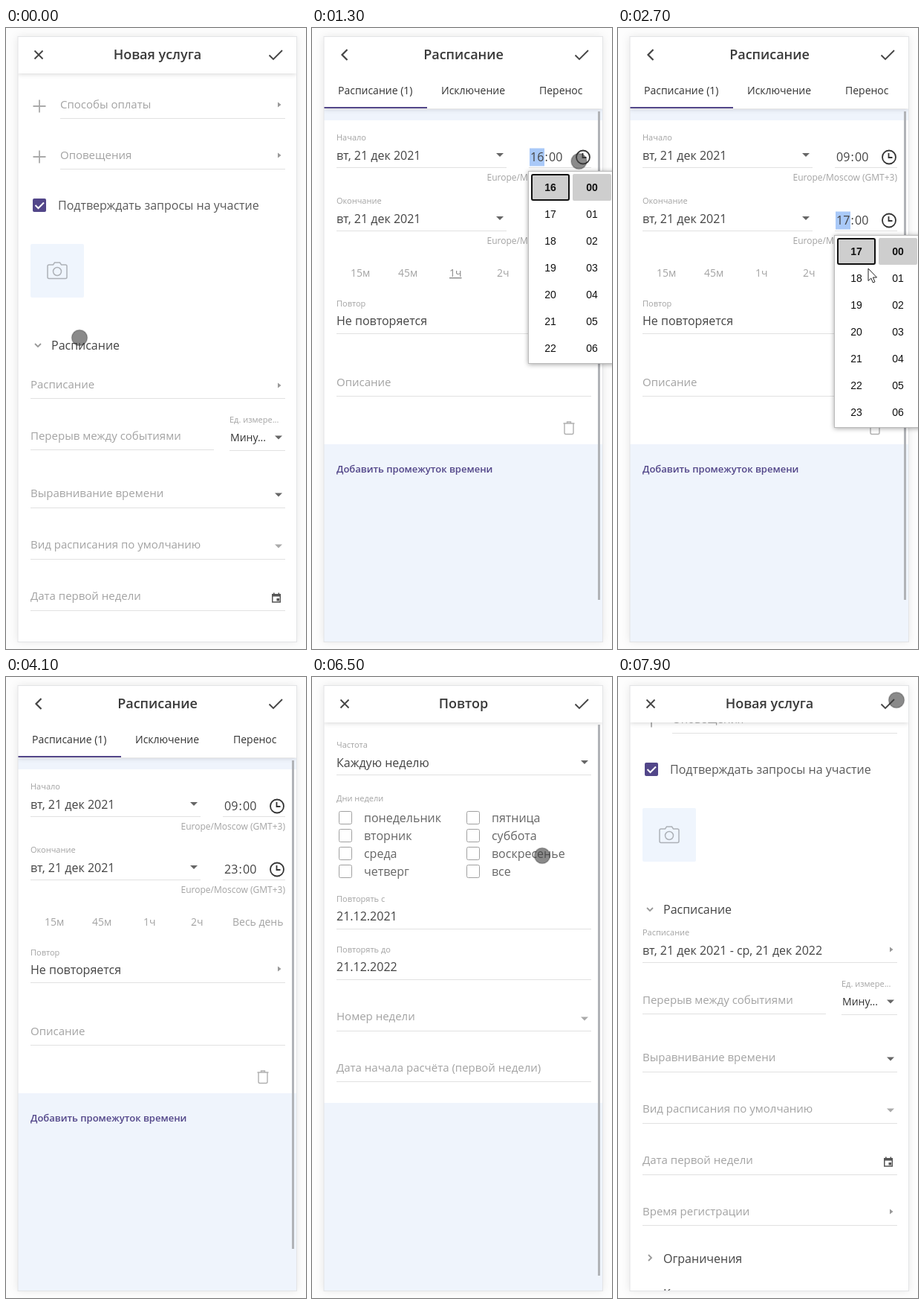
Recreate the animation shown at these times as an HTML page. Size 404 px wide and 834 px high, loop 8 s.

```html
<!DOCTYPE html>
<html lang="ru">
<head>
<meta charset="utf-8">
<title>Новая услуга</title>
<style>
html, body { margin: 0; height: 100%; overflow: hidden; background: #fdfdfd; }
svg { display: block; width: 100vw; height: 100vh; }
text { font-family: "Open Sans", "Noto Sans", sans-serif; white-space: pre; }
.rob { font-family: Roboto, sans-serif; }
.arial { font-family: "Liberation Sans", Arial, sans-serif; }
.shade { filter: drop-shadow(0 1px 3px rgba(0,0,0,.16)); }
.frame { filter: drop-shadow(0 0 6px rgba(0,0,0,.1)); }
.pop { filter: drop-shadow(0 1px 3px rgba(0,0,0,.35)); }
.modal { filter: drop-shadow(0 8px 12px rgba(0,0,0,.45)); }
</style>
</head>
<body>
<svg viewBox="0 0 404 834" preserveAspectRatio="none">
  <defs>
    <clipPath id="phone"><rect x="16" y="12" width="375" height="812"/></clipPath>
  </defs>
  <rect class="frame" x="16" y="12" width="375" height="812" fill="#fff"/>
  <g id="view" clip-path="url(#phone)"></g>
  <rect x="16" y="11.5" width="375.5" height="813" fill="none" stroke="#e3e4e6"/>
  <g id="over"></g>
  <g id="touch"><circle r="10.5" fill="#3c3c3c" fill-opacity=".6" stroke="#000" stroke-opacity=".2" stroke-width="1.6"/></g>
  <path id="arrow" d="M0 0V16.5L3.8 13L6.4 19L9 17.8L6.4 12H11.5Z" fill="#fff" stroke="#222"/>
</svg>
<script>
const INK = '#444', HINT = '#a3a3a3', PURPLE = '#524689', BLUE = '#eff4fc';
const $ = id => document.getElementById(id);

// y is the middle of the capital letters
const text = (s, x, y, size = 16, fill = INK, extra = '') =>
  `<text x="${x}" y="${y + size * .357}" font-size="${size}" fill="${fill}" ${extra}>${s}</text>`;
const hint = (s, x, y) => text(s, x, y, 15, HINT);
const label = (s, x, y) => text(s, x, y, 11, HINT);
const rect = (x, y, w, h, fill, extra = '') =>
  `<rect x="${x}" y="${y}" width="${w}" height="${h}" fill="${fill}" ${extra}/>`;
const rule = (y, x = 33, end = 376) => rect(x, y, end - x, 1, '#e1e1e1');
const stroke = (d, color, w = 2) => `<path d="${d}" fill="none" stroke="${color}" stroke-width="${w}"/>`;
const next = y => `<path d="M366 ${y - 3.5}l4.5 3.5l-4.5 3.5z" fill="#999"/>`;
const drop = (x, y, color = '#666') => `<path d="M${x - 5} ${y - 2.5}h10l-5 5z" fill="${color}"/>`;
const plus = y => stroke(`M36.5 ${y}h17M45 ${y - 8.5}v17`, '#aaa', 1.8);

const close = stroke('M38.5 30.5l11 11M49.5 30.5l-11 11', '#444', 1.8);
const back = stroke('M47.5 29l-7 7l7 7', '#444', 2.2);
const done = stroke('M354.5 36.5l5.5 5.5l12-12', '#444', 1.8);

function header(title, icon, h = 49) {
  return rect(16, 12, 375, h, '#fff', 'class="shade"') + icon + done +
    text(title, 204, 36, 18, '#3a3a3a', 'font-weight="600" text-anchor="middle"');
}

function tick(x, y, on) {
  return on
    ? rect(x, y, 18, 18, PURPLE, 'rx="2"') + stroke(`M${x + 3.5} ${y + 9}l4 4l7.5 -7.5`, '#fff')
    : rect(x + .5, y + .5, 17, 17, '#fff', 'rx="2" stroke="#a0a0a0"');
}

function service(planned) {
  const plan = planned
    ? label('Расписание', 33, 457) + text('вт, 21 дек 2021 - ср, 21 дек 2022', 33, 481) + next(480)
    : hint('Расписание', 33, 479) + next(480);
  const calendar = rect(358.8, 761, 10.5, 10, 'none', 'stroke="#555" stroke-width="1.5"') +
    rect(358, 760, 12, 3.5, '#555') + rect(360, 758.5, 1.6, 2, '#555') +
    rect(366.5, 758.5, 1.6, 2, '#555') + rect(364.5, 766, 3.5, 3.5, '#555');
  const camera = stroke('M58 318h5.5l2-3h7l2 3h5.500q2 0 2 2v14.500q0 2-2 2h-22q-2 0-2-2v-14.500q0-2 2-2z', '#adb1b7', 1.5) +
    '<circle cx="69" cy="327" r="5.5" fill="none" stroke="#adb1b7" stroke-width="1.5"/>';
  const rows = plus(105) + hint('Способы оплаты', 73, 103) + next(103) + rule(121, 73) +
    plus(173) + hint('Оповещения', 73, 171) + next(171) + rule(189, 73) +
    tick(36, 229, true) + text('Подтверждать запросы на участие', 70, 238, 16, '#5a5a5a') +
    rect(33, 290, 72, 72, '#eff5fd', 'rx="2"') + camera +
    stroke('M39 424l4 4l4-4', '#999', 1.8) + text('Расписание', 61, 426) +
    plan + rule(497) +
    hint('Перерыв между событиями', 33, 548) + rule(566, 33, 280) +
    label('Ед. измере...', 301, 526) + text('Мину...', 302, 550, 14, '#333', 'font-weight="500"') +
    drop(367, 550) + rule(567, 301) +
    hint('Выравнивание времени', 33, 625) + drop(367, 627) + rule(644) +
    hint('Вид расписания по умолчанию', 33, 694) + drop(367, 696, '#aaa') + rule(713) +
    hint('Дата первой недели', 33, 763) + calendar + rule(782) +
    hint('Время регистрации', 33, 832) + next(832) + rule(850) +
    stroke('M41 890l4 4l-4 4', '#999', 1.8) + text('Ограничения', 61, 895) +
    text('Клиенты', 61, 942);
  // the row below the fold only shows after scrolling
  return `<g transform="translate(0 ${planned ? -114 : 0})">${rows}</g>` +
    (planned ? '' : rect(16, 800, 375, 24, '#fff')) + header('Новая услуга', close);
}

function clockRow(y, hour, active) {
  return (active ? rect(293, y - 12, 20, 24, '#a9c9f8') : '') +
    text(hour, 294, y) + text(':', 313.5, y) + text('00', 319, y) +
    `<circle cx="365" cy="${y}" r="9" fill="none" stroke="#333" stroke-width="1.8"/>` +
    stroke(`M364.500 ${y - 5.5}v6h5`, '#333', 1.8);
}

function dateRow(name, y, hour, active) {
  return label(name, 33, y - 24) + text('вт, 21 дек 2021', 33, y) + drop(253, y - .5) +
    rule(y + 16, 33, 262) + rule(y + 16, 292) + clockRow(y + 2.5, hour, active) +
    text('Europe/Moscow (GMT+3)', 376, y + 30, 12, HINT, 'text-anchor="end"');
}

function schedule(t) {
  const changed = t >= 1900;
  const spans = [['15м', 52], ['45м', 116], ['1ч', 185], ['2ч', 249], ['Весь день', 305]]
    .map(([s, x], i) => i === 2 && !changed
      ? text(s, x, 329, 14, '#888', 'text-decoration="underline"')
      : text(s, x, 329, 14, HINT)).join('');
  const bin = stroke('M338.500 531h15M343.500 531v-2h5v2M340 531v12.500q0 2 2 2h8q2 0 2-2v-12.500', '#b0b0b0', 1.4);
  return rect(16, 109, 375, 15, BLUE) + rect(16, 559, 375, 265, BLUE) +
    dateRow('Начало', 171, changed ? '09' : '16', t >= 1300 && t < 2100) +
    dateRow('Окончание', 256, t >= 3300 ? '23' : '17', t >= 2600 && t < 3700) +
    spans + label('Повтор', 33, 370) +
    text(t > 7000 ? 'Каждую неделю' : 'Не повторяется', 33, 393) + next(392) + rule(410) +
    hint('Описание', 33, 476) + rule(494) + bin +
    text('Добавить промежуток времени', 33, 592, 13, PURPLE, 'font-weight="600"') +
    header('Расписание', back, 96) +
    text('Расписание (1)', 35, 84, 14, '#333') + text('Исключение', 174, 84, 14, '#333') +
    text('Перенос', 306, 84, 14, '#333') + rect(16, 106, 139, 2, PURPLE) +
    rect(385, 112, 3, 656, '#b1b3b7');
}

function repeat(t) {
  const weekly = t >= 6500;
  let out = label('Частота', 33, 91) + text(weekly ? 'Каждую неделю' : 'Не повторяется', 33, 115) +
    drop(367, 114.5) + rule(131) + header('Повтор', close);
  if (!weekly) return rect(16, 160, 375, 664, BLUE) + out;
  const days = ['понедельник', 'вторник', 'среда', 'четверг', 'пятница', 'суббота', 'воскресенье', 'все'];
  const checked = { 5: 6700, 6: 7100 };
  days.forEach((day, i) => {
    const x = i < 4 ? 36 : 208, y = 189 + i % 4 * 24;
    out += tick(x, y - 9, t >= checked[i]) + text(day, x + 34, y, 16, '#666');
  });
  return out + rect(16, 572, 375, 252, BLUE) + label('Дни недели', 33, 163) +
    label('Повторять с', 33, 298) + text('21.12.2021', 33, 321) + rule(338) +
    label('Повторять до', 33, 366) + text('21.12.2022', 33, 389) + rule(406) +
    hint('Номер недели', 33, 456) + drop(367, 459, '#aaa') + rule(475) +
    hint('Дата начала расчёта (первой недели)', 33, 525) + rule(543) +
    rect(385, 64, 3, 740, '#b1b3b7');
}

function dialog(t) {
  const chosen = t >= 6100 ? 4 : t >= 5000 ? 3 : 0;
  const options = ['Не повторяется', 'Каждые 15 минут', 'Каждый час', 'Каждый день', 'Каждую неделю'];
  return rect(16, 12, 375, 812, '#000', 'opacity=".32"') +
    rect(26, 241, 356, 355, '#fff', 'rx="4" class="modal"') +
    text('Частота', 49, 273, 20, '#222', 'class="rob"') +
    rect(26, 300, 356, 1, '#d2d2d2') + rect(26, 539, 356, 1, '#d2d2d2') +
    options.map((s, i) => {
      const y = 325 + i * 48, on = i === chosen;
      return `<circle cx="62" cy="${y}" r="9" fill="none" stroke="${on ? PURPLE : '#666'}" stroke-width="2"/>` +
        (on ? `<circle cx="62" cy="${y}" r="5" fill="${PURPLE}"/>` : '') +
        text(s, 98, y, 15, INK, 'class="rob" font-weight="500" letter-spacing=".4"');
    }).join('') +
    text('ВЫБРАТЬ', 293, 567, 14, PURPLE, 'class="rob"');
}

function picker(top, base, picked, scroll) {
  const cell = (x, n, y, on, focus) =>
    (on ? rect(x, y, 52, 36, '#cecece', 'rx="2"') : '') +
    (on && focus ? rect(x + 1, y + 1, 50, 34, 'none', 'rx="2" stroke="#111" stroke-width="2"') : '') +
    text(String(n).padStart(2, '0'), x + 26, y + 18, 14, '#111',
      `class="arial" text-anchor="middle" ${on ? 'font-weight="700"' : ''}`);
  let cells = '';
  for (let k = -8; k < 14; k++) {
    const n = (base + k + 24) % 24, y = top + 4 + (k - scroll) * 36;
    if (y > top - 36 && y < top + 259) cells += cell(295, n, y, n === picked, true);
  }
  for (let n = 0; n < 7; n++) cells += cell(351, n, top + 4 + n * 36, n === 0, false);
  return `<clipPath id="wheel"><rect x="292" y="${top + 2}" width="112" height="255"/></clipPath>` +
    rect(291.5, top + .5, 120, 258, '#fff', 'stroke="#bbb" class="pop"') +
    `<g clip-path="url(#wheel)">${cells}</g>`;
}

const ramp = (t, a, b) => Math.min(1, Math.max(0, (t - a) / (b - a)));

// [time, x, y]
const touches = [
  [0, 99, 416], [400, 150, 478], [600, 150, 478], [1200, 365, 174], [2000, 321, 214],
  [2200, 230, 440], [2500, 365, 259], [3700, 250, 560], [4200, 320, 470], [4300, 300, 395],
  [4400, 300, 393], [4600, 300, 115], [4700, 300, 115], [4900, 62, 469], [5000, 62, 469],
  [5200, 335, 588], [5400, 344, 590], [5500, 344, 590], [5800, 150, 336], [6000, 62, 517],
  [6100, 62, 517], [6400, 335, 588], [6500, 310, 240], [6600, 225, 208], [6800, 220, 208],
  [7000, 220, 231], [7300, 220, 231], [7400, 375, 24], [7500, 375, 24], [7600, 375, 31]
];
const arrows = [
  [1400, 337, 240], [1800, 330, 214], [1900, 322, 212], [2000, 318, 214],
  [2700, 337, 323], [3200, 321, 512], [3300, 321, 512], [3600, 270, 560]
];

function along(track, t) {
  const i = track.findIndex(p => p[0] > t);
  if (i < 0) return track[track.length - 1].slice(1);
  if (!i) return track[0].slice(1);
  const [a, x, y] = track[i - 1], [b, u, v] = track[i], k = ramp(t, a, b);
  return [x + (u - x) * k, y + (v - y) * k];
}

function place(id, track, t, shown) {
  const [x, y] = along(track, t);
  $(id).setAttribute('transform', `translate(${x} ${y})`);
  $(id).style.display = shown ? '' : 'none';
}

function draw(t) {
  const within = (a, b) => t >= a && t < b;
  let page;
  if (t < 600) page = service(false);
  else if (t < 4500 || within(7600, 7800)) page = schedule(t);
  else if (t < 7600) page = repeat(t) + (within(4700, 6500) ? dialog(t) : '');
  else page = service(true);
  $('view').innerHTML = page;

  let over = '';
  if (within(1300, 2100)) over = picker(192, 16, t >= 1900 ? 9 : 16, -7 * ramp(t, 1300, 1800));
  if (within(2600, 3700)) over = picker(278, 17, t >= 3300 ? 23 : 17, 6 * ramp(t, 3200, 3500));
  $('over').innerHTML = over;

  const mouse = within(1400, 2100) || within(2700, 3700);
  place('arrow', arrows, t, mouse);
  place('touch', touches, t, !mouse && !within(3800, 4200));
}

const start = performance.now();
let last = -1;
function tickFrame() {
  const t = Math.floor((performance.now() - start) % 8000 / 100) * 100;
  if (t !== last) draw(last = t);
  requestAnimationFrame(tickFrame);
}
tickFrame();
</script>
</body>
</html>
```
